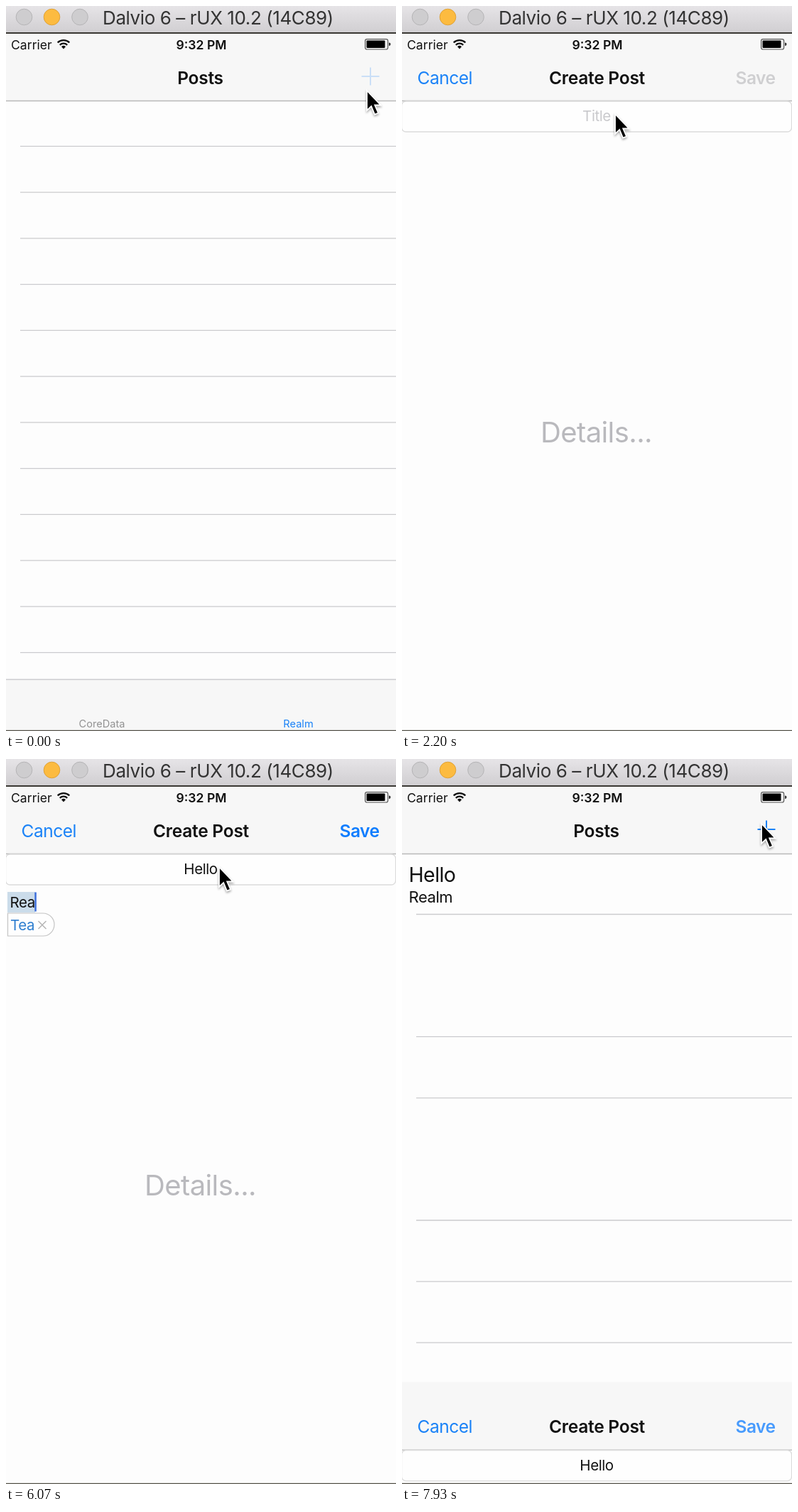
An HTML page that plays this animation: 549x1020 px, repeating every 8000 ms.

```html
<!DOCTYPE html>
<html lang="en">
<head>
<meta charset="utf-8">
<title>Create a post</title>
<style>
  html, body { margin: 0; width: 100%; height: 100%; overflow: hidden; background: #fdfdfd; }
  svg { display: block; width: 549px; height: 1020px; }
  text { font-family: Inter, "Liberation Sans", sans-serif; letter-spacing: -.02em; fill: #111; white-space: pre; }
  .mid { text-anchor: middle; }
  .window { font-size: 26px; letter-spacing: -.016em; fill: #333; }
  .status { font-size: 17.6px; letter-spacing: 0; }
  .nav { font-size: 24.5px; }
  .heading { font-size: 24.5px; letter-spacing: -.01em; }
  .bold { font-weight: 600; }
  .field { font-size: 20.5px; }
  .details { font-size: 40px; letter-spacing: -.015em; fill: #b9b9bd; }
  .tab { font-size: 14.6px; letter-spacing: 0; }
  .hint { fill: #c9c9cc; }
  .blue { fill: #1a82f7; }
  .line { stroke: #cbcbce; stroke-width: 1.3; }
  .edge { stroke: #b9b9b9; stroke-width: 1.3; }
  .bar { fill: #f7f7f7; }
  .page { fill: #fdfdfd; }
  .caret { fill: #3e6fdb; }
</style>
</head>
<body>
<svg viewBox="0 0 549 1020">
  <defs>
    <linearGradient id="chrome" x2="0" y2="1">
      <stop stop-color="#e6e4e7"/><stop offset="1" stop-color="#d0ced1"/>
    </linearGradient>
    <clipPath id="screen"><rect y="38" width="549" height="982"/></clipPath>
  </defs>

  <g clip-path="url(#screen)">
    <g id="list">
      <rect class="page" width="549" height="1020"/>
      <rect class="bar" y="38" width="549" height="95"/>
      <path class="edge" d="M0 133.5H549"/>
      <text class="heading bold mid" x="273.5" y="109.5">Posts</text>
      <path id="plus" d="M500.5 99H525.5M513 86.5V111.5" stroke="#1a82f7" stroke-width="2"/>
      <g id="emptyRows" class="line"></g>
      <g id="filledRows" class="line"></g>
      <g id="post">
        <text x="9.5" y="173" font-size="28.5">Hello</text>
        <text x="9.5" y="202" font-size="22">Realm</text>
      </g>
      <rect class="bar" y="947" width="549" height="73"/>
      <path class="line" d="M0 947.5H549"/>
      <text class="tab mid" x="135" y="1015" style="fill:#929292">CoreData</text>
      <text class="tab mid blue" x="411.5" y="1015">Realm</text>
    </g>

    <g id="form">
      <rect class="page" y="38" width="549" height="982"/>
      <rect class="bar" y="38" width="549" height="95"/>
      <path class="edge" d="M0 133.5H549"/>
      <text class="nav blue" x="21.5" y="109.5">Cancel</text>
      <text class="heading bold mid" x="274.5" y="109.5">Create Post</text>
      <text id="save" class="nav bold" x="469.5" y="109.5">Save</text>
      <rect x="-.5" y="134" width="549" height="43" rx="6" fill="#fefefe" stroke="#dcdcdc" stroke-width="1.3"/>
      <text id="title" class="field mid" x="274" y="162"></text>
      <rect id="titleCaret" class="caret" y="141" width="2.5" height="27"/>
      <text class="details mid" x="273.5" y="614">Details...</text>
      <rect id="mark" x="2" y="187" width="39" height="29" fill="#cbdcea"/>
      <text id="details" class="field" x="5.5" y="209"></text>
      <rect id="detailsCaret" class="caret" y="187.5" width="2.5" height="27"/>
      <g id="hint">
        <path d="M2.5 217H52a16 16 0 0 1 0 32H2.5Z" fill="#fefefe" stroke="#c4c4c4" stroke-width="1.2"/>
        <text class="field" x="6" y="240.5" style="fill:#2f7fd0">Tea</text>
        <path d="M45.5 228l11 11m0-11l-11 11" stroke="#b5b5b5" stroke-width="1.5"/>
      </g>
    </g>
  </g>

  <text class="status" x="7" y="60.5">Carrier</text>
  <g fill="none" stroke="#111" stroke-width="2.4">
    <path d="M72.7 51.5a11.8 11.8 0 0 1 16.6 0M75.8 54.8a7.4 7.4 0 0 1 10.4 0"/>
    <path d="M81 60.5l-3-3.3a4.3 4.3 0 0 1 6 0Z" fill="#111" stroke="none"/>
  </g>
  <text class="status bold mid" x="275" y="60.5">9:32 PM</text>
  <rect x="505.6" y="46.6" width="32" height="14.4" rx="2.5" fill="none" stroke="#555" stroke-width="1.2"/>
  <rect x="507.5" y="48.5" width="26" height="10.6" rx="1" fill="#000"/>
  <path d="M539 51.5q2.5 0 2.5 2.3t-2.5 2.3Z" fill="#333"/>

  <rect width="549" height="38" fill="url(#chrome)"/>
  <path d="M0 38H549" stroke="#3a3833" stroke-width="2"/>
  <path d="M0 1019.5H549" stroke="#55534a" stroke-width="1.5"/>
  <g fill="#cecdcf" stroke="#b5b4b6">
    <circle cx="25.5" cy="15.5" r="11.3"/>
    <circle cx="64.5" cy="15.5" r="11.3" fill="#fcbb40" stroke="#dfa136"/>
    <circle cx="104" cy="15.5" r="11.3"/>
  </g>
  <text class="window mid" x="298.5" y="25.5">Dalvio 6 – rUX 10.2 (14C89)</text>

  <path id="pointer" d="M0 0V28l6.2-6 4.8 11.5 5-2-4.8-11h8.3Z" fill="#000" stroke="#fff" stroke-width="1.8"
        style="filter:drop-shadow(0 2px 1.5px #0005)"/>
</svg>

<script>
const LOOP = 8000, STEP = 1000 / 15, TRAVEL = 982;
const PRESENT = 150, DISMISS = 7690, SAVE_ON = 5400;
const el = {};
document.querySelectorAll('[id]').forEach(node => el[node.id] = node);

// Rows are [time, ...values], joined by straight segments.
const pointerPath = [
  [600, 508, 119], [730, 468, 140], [870, 350, 190], [930, 314, 193], [1070, 302, 162], [1200, 300, 152],
  [7130, 300, 152], [7270, 375, 130], [7400, 475, 100], [7530, 506, 91]
];
const titleBlink = [[1330, 0], [1470, 1], [1870, 1], [2200, 0], [2600, 0], [2740, 1], [4030, 1], [4070, 0]];
const detailsBlink = [[4330, 0], [4400, 1], [4800, 1], [5130, 0], [5330, 0], [5400, 1], [7200, 1], [7400, 0]];
const plusPress = [[60, .2], [400, 1]];
const savePress = [[7560, 1], [7600, .3], [7730, .3], [8000, .9]];

// Rows are [time, number of letters typed].
const titleKeys = [[2740, 1], [2940, 2], [3130, 3], [3400, 4], [3600, 5]];
const detailsKeys = [[5400, 1], [5700, 2], [5930, 3], [6270, 4], [6530, 5]];

function along(rows, t) {
  if (t <= rows[0][0]) return rows[0].slice(1);
  const next = rows.findIndex(row => row[0] > t);
  if (next < 0) return rows.at(-1).slice(1);
  const a = rows[next - 1], b = rows[next], k = (t - a[0]) / (b[0] - a[0]);
  return a.slice(1).map((v, i) => v + (b[i + 1] - v) * k);
}

const typed = (word, keys, t) => word.slice(0, keys.filter(key => t >= key[0]).length);

// Critically damped spring: share of the travel still left.
function springLeft(ms) {
  const x = Math.max(0, ms) * .014;
  return (1 + x) * Math.exp(-x);
}

const show = (node, on) => node.style.display = on ? '' : 'none';

function drawRows(group, ys) {
  group.innerHTML = ys.map(y => `<path d="M20 ${y}H549"/>`).join('');
}
drawRows(el.emptyRows, Array.from({ length: 12 }, (_, i) => 197.3 + i * 64.75));
drawRows(el.filledRows, [0, 2, 3, 5, 6, 7].map(i => 218.5 + i * 86.1));

function render(t) {
  const saved = t > 4000;
  show(el.emptyRows, !saved);
  show(el.filledRows, saved);
  show(el.post, saved);
  el.plus.style.opacity = along(plusPress, t)[0];

  const left = saved ? 1 - springLeft(t - DISMISS) : springLeft(t - PRESENT);
  el.form.setAttribute('transform', `translate(0 ${(left * TRAVEL).toFixed(2)})`);

  const title = typed('Hello', titleKeys, t);
  el.title.textContent = title || 'Title';
  el.title.classList.toggle('hint', !title);
  const half = el.title.getComputedTextLength() / 2;
  el.titleCaret.setAttribute('x', 274 + (title ? half - 1 : -half - 1));
  el.titleCaret.style.opacity = along(titleBlink, t)[0];

  const details = typed('Realm', detailsKeys, t);
  el.details.textContent = details;
  const width = details ? el.details.getComputedTextLength() : 0;
  el.detailsCaret.setAttribute('x', 5 + width);
  el.detailsCaret.style.opacity = along(detailsBlink, t)[0];
  const suggesting = details === 'Rea';
  show(el.mark, suggesting);
  show(el.hint, suggesting);

  el.save.style.fill = t < SAVE_ON ? '#cfcfd1' : '#0f7dff';
  el.save.style.opacity = along(savePress, t)[0];

  el.pointer.setAttribute('transform', `translate(${along(pointerPath, t)})`);
}

const start = performance.now();
function tick() {
  const t = Math.max(0, performance.now() - start) % LOOP;
  render(Math.floor((t + 4) / STEP) * STEP);
  requestAnimationFrame(tick);
}
tick();
</script>
</body>
</html>
```
